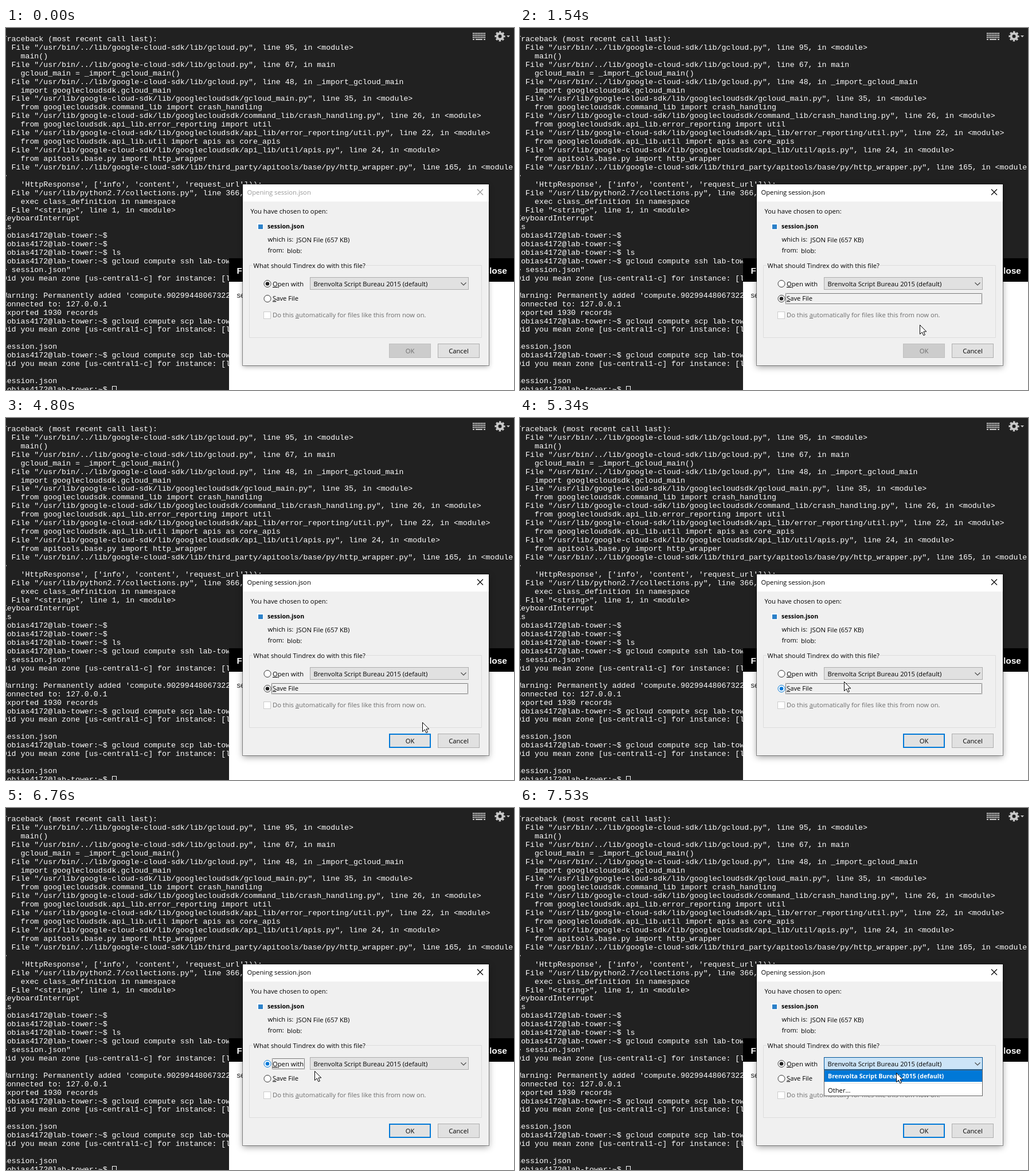
Animation of 886 by 632 pixels, one loop 7990 ms. Source, as an HTML page:

```html
<!DOCTYPE html>
<html lang="en">
<head>
<meta charset="utf-8">
<title>Opening session.json</title>
<style>
html, body { margin: 0; width: 100%; height: 100%; overflow: hidden; background: #212121; }
svg { display: block; }
text { white-space: pre; }
.term { font: 13.26px "Liberation Mono", monospace; fill: #fff; }
.ui { font: 11.22px "Open Sans", sans-serif; fill: #000; }
.ui .bold { font-weight: 700; font-size: 10.65px; }
.ui .dim { fill: #6d6d6d; }
.page { font: bold 15.5px "Liberation Sans", sans-serif; fill: #fff; }
.page .body { font-weight: 400; font-size: 13px; fill: #222; }
.u { text-decoration: underline; }
.line { fill: none; stroke: #dcdcdc; }
.btn { fill: #e1e1e1; stroke: #adadad; }
.hot { fill: #e5f1fb; stroke: #0078d7; }
.open { fill: #cce4f7; stroke: #005499; }
.off { fill: #ccc; stroke: #bfbfbf; }
#ok { x: 668.5px; y: 551.5px; width: 72px; height: 24px; }
#ok.main { fill: #e1e1e1; stroke: #0078d7; stroke-width: 2; x: 669px; y: 552px; width: 71px; height: 23px; }
.focus { fill: none; stroke: #000; stroke-dasharray: 1 1; stroke-dashoffset: .5; }
.radio { fill: #fff; stroke: #333; color: #222; }
.radio.hot { stroke: #0078d7; color: #0078d7; }
.radio.down { fill: #cce4f7; stroke: #005499; color: #005499; }
.radio .dot { fill: currentColor; stroke: none; }
#frame { filter: drop-shadow(0 2px 4px rgba(0,0,0,.35)); }
.active #frame { filter: drop-shadow(0 3px 6px rgba(0,0,0,.38)); }
#title { fill: #999; }
.active #title { fill: #000; }
#x { fill: none; stroke: #999; stroke-width: 1.1; }
.active #x { stroke: #000; }
</style>
</head>
<body>
<svg width="886" height="632" viewBox="0 0 886 632">
  <rect width="886" height="632" fill="#212121"/>
  <g id="term" class="term"></g>
  <rect x="185.5" y="625.5" width="7" height="12" fill="none" stroke="#fff"/>

  <g fill="none" stroke="#c8c8c8">
    <path d="M814 9.5h22M814 13h22M814 16.5h22" stroke-width="2.4" stroke-dasharray="2 .86"/>
    <path d="M814 20h3m2 0h12m2 0h3" stroke-width="2"/>
    <circle cx="861.5" cy="14.5" r="5" stroke-width="4"/>
    <circle cx="861.5" cy="14.5" r="7.4" stroke-width="3.4" stroke-dasharray="3.2 2.612" stroke-dashoffset="1.6"/>
    <path d="M873 13h6l-3 3.2z" fill="#c8c8c8" stroke="none"/>
  </g>

  <g class="page">
    <rect x="389" y="402" width="497" height="230" fill="#fff"/>
    <rect x="389" y="402" width="497" height="41" fill="#000"/>
    <text x="402.5" y="429">File</text>
    <text x="874" y="429" text-anchor="end">Close</text>
    <text class="body" x="402.5" y="471">session.json</text>
  </g>

  <g id="dialog" class="ui">
    <rect id="frame" x="413" y="273" width="429" height="316" fill="#f0f0f0"/>
    <rect x="412.5" y="272.5" width="430" height="317" fill="none" stroke="#000" stroke-opacity=".4"/>
    <rect x="413" y="273" width="429" height="30" fill="#fff"/>
    <text id="title" x="420.5" y="291">Opening session.json</text>
    <path id="x" d="M822 281.5l10 10m0-10l-10 10"/>

    <text x="426.5" y="324">You have chosen to open:</text>
    <rect x="438" y="341" width="11" height="11" fill="#fff"/>
    <rect x="440" y="343" width="8" height="8" fill="#2b80c8"/>
    <text class="bold" x="456" y="350">session.json</text>
    <text x="456.5" y="373">which is:</text>
    <text x="506.5" y="374">JSON File (657 KB)</text>
    <text x="456.5" y="392">from:</text>
    <text x="490" y="393">blob:</text>

    <path class="line" d="M430 414.5H424.5V540.5H829.5V414.5H627"/>
    <text x="431.5" y="419">What should Tindrex do with this file?</text>

    <g id="rOpen" class="radio"><circle cx="456" cy="446.5" r="6"/><circle class="dot" cx="456" cy="446.5" r="3.3"/></g>
    <text x="465" y="451"><tspan class="u">O</tspan>pen with</text>
    <rect id="fOpen" class="focus" x="464.5" y="437.5" width="56" height="18"/>

    <rect id="combo" class="btn" x="530.5" y="435.5" width="276" height="21"/>
    <text x="536.5" y="451">Brenvolta Script Bureau 2015 (default)</text>
    <path d="M793.5 444.5l4.5 4.5 4.5-4.5" fill="none" stroke="#444" stroke-width="1.1"/>

    <g id="rSave" class="radio"><circle cx="456" cy="472.5" r="6"/><circle class="dot" cx="456" cy="472.5" r="3.3"/></g>
    <text x="465" y="476"><tspan class="u">S</tspan>ave File</text>
    <rect id="fSave" class="focus" x="463.5" y="463.5" width="342" height="18"/>

    <rect x="449.5" y="495.5" width="12" height="12" fill="#fff" stroke="#ccc"/>
    <text class="dim" x="465" y="505">Do this <tspan class="u">a</tspan>utomatically for files like this from now on.</text>

    <rect id="ok"/>
    <text id="okText" x="704.5" y="568" text-anchor="middle">OK</text>
    <rect class="btn" x="753.5" y="551.5" width="72" height="24"/>
    <text x="789.5" y="568" text-anchor="middle">Cancel</text>

    <g id="list">
      <rect x="530.5" y="457.5" width="276" height="45" fill="#fff" stroke="#646464"/>
      <rect x="531" y="458" width="275" height="20" fill="#0078d7"/>
      <text class="bold" x="537" y="472" fill="#fff">Brenvolta Script Bureau 2015 (default)</text>
      <path class="line" d="M559 480.5H805"/>
      <text x="537" y="497">Other...</text>
    </g>
  </g>

  <path id="cursor" d="M.5.5V16.5L4.3 13 6.9 18.7 9.4 17.6 6.9 12H11.8Z" fill="#fff" stroke="#000"/>
</svg>
<script>
const LOOP = 7990;
const $ = id => document.getElementById(id);

const prompt = 'tobias4172@lab-tower:~$ ';
const sdk = '/usr/lib/google-cloud-sdk/lib/';
const bin = '/usr/bin/../lib/google-cloud-sdk/lib/';
const trace = (file, line, where) => `  File "${file}", line ${line}, in ${where}`;
const zone = 'Did you mean zone [us-central1-c] for instance: [lab-tower]';
const copy = prompt + 'gcloud compute scp lab-tower:';

const rows = [
  'Traceback (most recent call last):',
  trace(bin + 'gcloud.py', 95, '<module>'),
  '    main()',
  trace(bin + 'gcloud.py', 67, 'main'),
  '    gcloud_main = _import_gcloud_main()',
  trace(bin + 'gcloud.py', 48, '_import_gcloud_main'),
  '    import googlecloudsdk.gcloud_main',
  trace(sdk + 'googlecloudsdk/gcloud_main.py', 35, '<module>'),
  '    from googlecloudsdk.command_lib import crash_handling',
  trace(sdk + 'googlecloudsdk/command_lib/crash_handling.py', 26, '<module>'),
  '    from googlecloudsdk.api_lib.error_reporting import util',
  trace(sdk + 'googlecloudsdk/api_lib/error_reporting/util.py', 22, '<module>'),
  '    from googlecloudsdk.api_lib.util import apis as core_apis',
  trace(sdk + 'googlecloudsdk/api_lib/util/apis.py', 24, '<module>'),
  '    from apitools.base.py import http_wrapper',
  trace(bin + 'third_party/apitools/base/py/http_wrapper.py', 165, '<module'),
  '>',
  "    'HttpResponse', ['info', 'content', 'request_url'])):",
  trace('/usr/lib/python2.7/collections.py', 366, 'namedtuple'),
  '    exec class_definition in namespace',
  trace('<string>', 1, '<module>'),
  'KeyboardInterrupt',
  'ls',
  prompt,
  prompt,
  prompt + 'ls',
  prompt + 'gcloud compute ssh lab-tower',
  '> session.json"',
  zone,
  '',
  "Warning: Permanently added 'compute.90299448067322'",
  'Connected to: 127.0.0.1',
  'exported 1930 records',
  copy, zone, '', 'session.json',
  copy, zone, '', 'session.json',
  prompt
];
rows.forEach((row, i) => {
  const el = document.createElementNS('http://www.w3.org/2000/svg', 'text');
  el.setAttribute('x', -6.3);
  el.setAttribute('y', Math.round(23 + i * 14.925));
  el.textContent = row;
  $('term').append(el);
});

// Pointer hops: first step, last step, number of steps, x, y
const hops = [
  [150, 150, 1, 803, 614],
  [230, 690, 7, 640, 472],
  [1390, 1540, 3, 697, 518],
  [1620, 2160, 8, 723, 551],
  [2240, 2240, 1, 722, 556],
  [4800, 4800, 1, 726, 531],
  [4880, 5500, 9, 545, 451],
  [5730, 5730, 1, 526, 453],
  [5800, 5800, 1, 522, 452],
  [5880, 5880, 1, 508, 452],
  [6760, 6760, 1, 538, 459],
  [6840, 6980, 3, 590, 466],
  [7050, 7280, 4, 655, 455],
  [7530, 7530, 1, 656, 462]
];

function pointer(t) {
  let x = 803, y = 650;
  for (const [from, to, n, tx, ty] of hops) {
    if (t < from) break;
    const k = t >= to ? 1 : (Math.floor((t - from) / (to - from) * (n - 1)) + 1) / n;
    const e = n > 4 ? k * (2 - k) : k;
    x += (tx - x) * e;
    y += (ty - y) * e;
  }
  return [x, y];
}

const inside = ([x, y], l, t, r, b) => x >= l && x <= r && y >= t && y <= b;
const show = (id, on) => $(id).style.display = on ? '' : 'none';
const setClass = (id, name) => $(id).setAttribute('class', name);

function radio(id, t, area, checked, press, release) {
  const hot = inside(pointer(t), ...area) || inside(pointer(t - 75), ...area);
  const down = t >= press && t < release;
  setClass(id, 'radio' + (down ? ' down' : hot && t < 7450 ? ' hot' : ''));
  $(id).lastChild.style.display = checked ? '' : 'none';
}

function draw(t) {
  const p = pointer(t);
  const save = t >= 1160 && t < 6210;
  const listed = t >= 7450;
  $('cursor').setAttribute('transform', `translate(${Math.round(p[0])} ${Math.round(p[1])})`);
  $('dialog').classList.toggle('active', t >= 1010);

  radio('rOpen', t, [449, 437, 521, 456], !save, 6040, 6210);
  radio('rSave', t, [449, 463, 806, 482], save, 1010, 1160);
  show('fSave', t >= 1090 && t < 6120);
  show('fOpen', t >= 6120 && !listed);

  setClass('combo', listed ? 'open' : inside(p, 530, 435, 807, 457) ? 'hot' : 'btn');
  show('list', listed);

  const enabled = t >= 2010;
  setClass('ok', !enabled ? 'off' : inside(p, 668, 551, 741, 577) ? 'hot' : 'main');
  setClass('okText', enabled ? '' : 'dim');
}

const start = performance.now();
function tick() {
  draw((performance.now() - start) % LOOP);
  requestAnimationFrame(tick);
}
tick();
</script>
</body>
</html>
```
